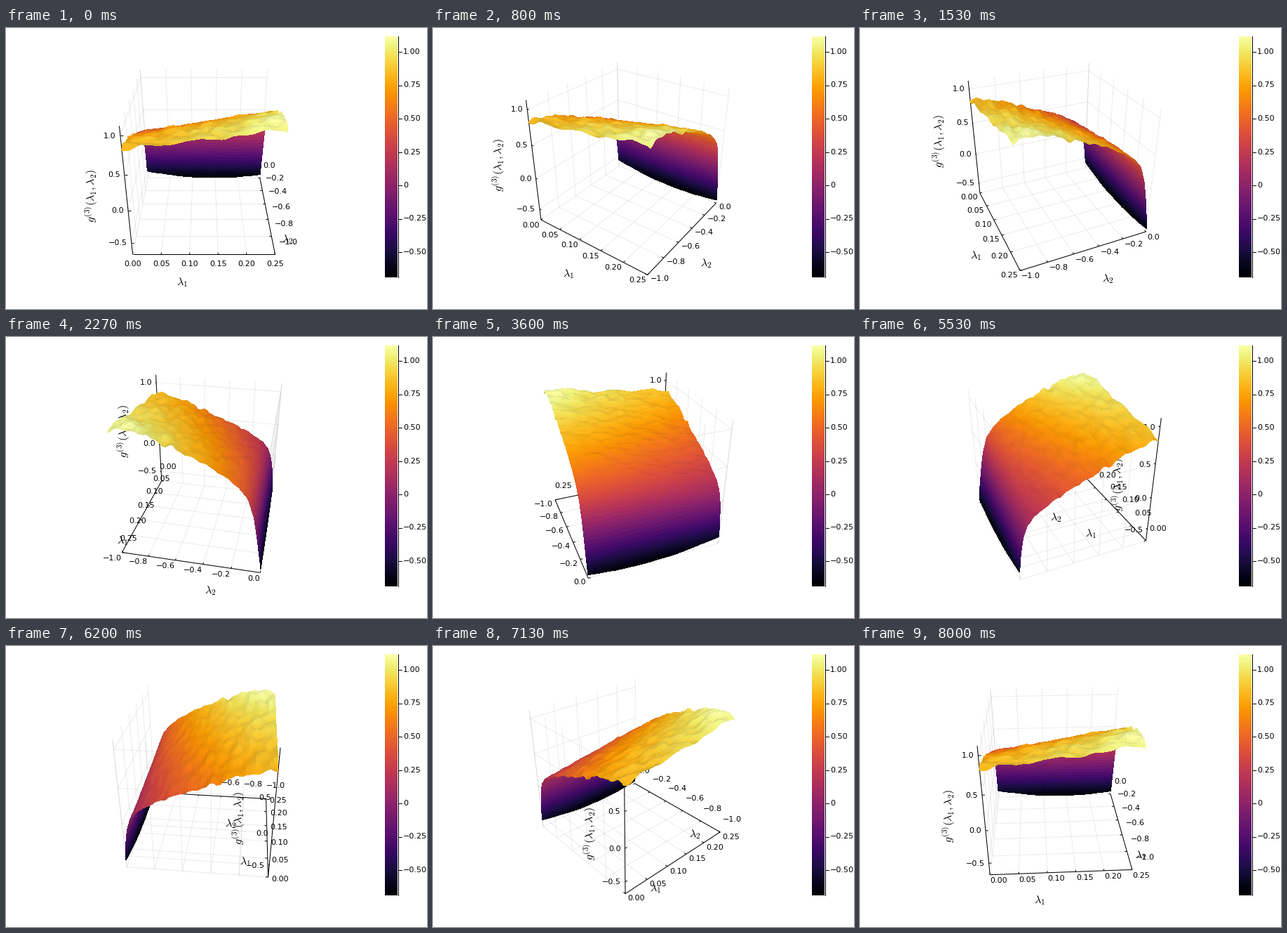
A matplotlib script for the animation above (8.07 s loop, 600 px wide and 400 px high).

```python
import numpy as np
import matplotlib.pyplot as plt
from matplotlib.animation import FuncAnimation
from matplotlib.collections import LineCollection, PolyCollection

W, H = 600, 400
FRAMES, LOOP_MS = 121, 8070
ZMIN, ZMAX = -0.689, 1.116
CX, CY = 282, 183.5                  # centre of the 3D viewport
ELEV = np.radians(30)
DIST = np.sqrt(3) / np.sin(np.radians(15))
FOCAL = 172 / np.tan(np.radians(15))
CMAP = plt.get_cmap("inferno")

plt.rcParams.update({"font.family": "DejaVu Sans", "mathtext.fontset": "cm"})


def unit_z(v):
    """Map a value to the [-1, 1] height of the plot box."""
    return 2 * (v - ZMIN) / (ZMAX - ZMIN) - 1


def view(deg):
    a = np.radians(deg)
    s, c = np.sin(a), np.cos(a)
    se, ce = np.sin(ELEV), np.cos(ELEV)
    right = np.array([c, s, 0])
    up = np.array([-s * se, c * se, ce])
    cam = np.array([s * ce, -c * ce, se])
    return right, up, cam


def project(p, v):
    """Perspective projection to pixels, plus the depth."""
    right, up, cam = v
    depth = DIST - p @ cam
    xy = np.stack([CX + FOCAL * (p @ right) / depth,
                   CY - FOCAL * (p @ up) / depth], axis=-1)
    return xy, depth


def smooth_noise(shape, passes, seed=4):
    n = np.random.RandomState(seed).randn(*shape)
    for axis, count in enumerate(passes):
        for _ in range(count):
            n = (np.roll(n, 1, axis) + 2 * n + np.roll(n, -1, axis)) / 4
    return n / n.std()


def build_surface(nx=52, ny=82):
    t = np.linspace(0, 1, nx)[:, None]
    lam = np.linspace(0, 1, ny)[None, :] ** 1.8
    power = 0.5 + 0.16 * (1 - t) ** 2
    rise = (0.86 + 0.39 * t) * lam ** power - 0.2 * t * lam ** 4
    drop = 0.56 + 0.07 * t + 0.36 * t * (1 - t)
    fall = drop * np.exp(-(lam / (0.03 + 0.032 * t)) ** (1 + 0.6 * t))
    bump = 0.06 * np.exp(-((t - 0.95) / 0.14) ** 2 - ((lam - 0.88) / 0.09) ** 2)
    rough = 0.017 * (0.2 + lam) * smooth_noise((nx, ny), (4, 1))
    g = np.clip(rise - fall + bump + rough, ZMIN, ZMAX)
    x = np.broadcast_to(2 * t - 1, g.shape)
    y = np.broadcast_to(1 - 2 * lam, g.shape)
    return np.stack([x, y, unit_z(g)], axis=-1), g


pts, values = build_surface()


def corners(a):
    return a[:-1, :-1], a[1:, :-1], a[1:, 1:], a[:-1, 1:]


quads = np.stack(corners(pts), axis=2).reshape(-1, 4, 3)
mean_val = sum(corners(values)).ravel() / 4
base_rgb = CMAP((mean_val - ZMIN) / (ZMAX - ZMIN))[:, :3]
normals = np.cross(quads[:, 2] - quads[:, 0], quads[:, 3] - quads[:, 1])
normals /= np.linalg.norm(normals, axis=1, keepdims=True)

# Tick values and their places in the box
XT = np.arange(6) * 0.05
YT = np.arange(-5, 1) * 0.2
ZT = np.array([-0.5, 0.0, 0.5, 1.0])
ux, uy, uz = 8 * XT - 1, 2 * YT + 1, unit_z(ZT)


def grid_lines():
    segs = []
    for x in ux:
        segs += [[(x, -1, -1), (x, 1, -1)], [(x, 1, -1), (x, 1, 1)]]
    for y in uy:
        segs += [[(-1, y, -1), (1, y, -1)], [(-1, y, -1), (-1, y, 1)]]
    for z in uz:
        segs += [[(-1, 1, z), (1, 1, z)], [(-1, -1, z), (-1, 1, z)]]
    return np.array(segs, float)


def axis_lines(tick=0.035):
    segs = [[(-1, -1, -1), (1, -1, -1)],
            [(1, -1, -1), (1, 1, -1)],
            [(-1, -1, -1), (-1, -1, 1)]]
    segs += [[(x, -1, -1), (x, -1 + tick, -1)] for x in ux]
    segs += [[(1, y, -1), (1 - tick, y, -1)] for y in uy]
    segs += [[(-1, -1, z), (-1 + tick, -1, z)] for z in uz]
    return np.array(segs, float)


GRID, AXES = grid_lines(), axis_lines()

fig = plt.figure(figsize=(W / 100, H / 100), dpi=100, facecolor="white")
ax = fig.add_axes([0, 0, 1, 1])
ax.set_xlim(0, W)
ax.set_ylim(H, 0)
ax.axis("off")

PX = 0.72                            # points per pixel
grid = LineCollection([], colors=(0, 0, 0, 0.08), linewidths=PX, zorder=1)
axes = LineCollection([], colors="black", linewidths=PX, zorder=2)
surf = PolyCollection([], edgecolors="face", linewidths=0.3,
                      antialiaseds=False, zorder=4)
for c in (grid, axes, surf):
    ax.add_collection(c, autolim=False)


def number(v, digits):
    return f"{v:.{digits}f}".replace("-", "\u2212")


def labels(vals, digits):
    return [ax.text(0, 0, number(v + 0.0, digits), size=8, va="center", zorder=3)
            for v in vals]


def title(s, rotation=0):
    return ax.text(0, 0, s, size=11.6, ha="center", va="center",
                   rotation=rotation, zorder=3)


def box_points(x, y, z):
    return np.stack(np.broadcast_arrays(x, y, z), axis=-1).astype(float)


x_lab, y_lab, z_lab = labels(XT, 2), labels(np.round(YT, 1), 1), labels(ZT, 1)
x_pos = box_points(ux, -1, -1)
y_pos = box_points(1, uy, -1)
z_pos = box_points(-1, -1, uz)

titles = [(title(r"$\lambda_1$"), (0, -1, -1), (-31, 40.5)),
          (title(r"$\lambda_2$"), (1, 0, -1), (30, 40.5)),
          (title(r"$g^{(3)}(\lambda_1,\lambda_2)$", 90), (-1, -1, 0), (-50, 0))]


def draw_colorbar():
    ramp = np.linspace(1, 0, 256)[:, None]
    ax.imshow(ramp, cmap=CMAP, extent=(540, 558, 355, 12), aspect="auto",
              interpolation="nearest", zorder=1)
    ax.set_xlim(0, W)
    ax.set_ylim(H, 0)
    ax.plot([558.5, 558.5], [12, 355], color="black", lw=PX, zorder=2)
    for v in np.arange(-2, 5) * 0.25:
        y = 224 - 190 * v
        ax.plot([558.5, 564], [y, y], color="black", lw=PX, zorder=2)
        ax.text(566, y, number(v, 2) if v else "0", size=8, va="center")


def tick_offset(q):
    """Alignment and pixel offset of floor labels for a relative azimuth."""
    s, c = np.sin(np.radians(q)), np.cos(np.radians(q))
    if abs(s) < 1e-9:
        return "center", 0, 14 if c > 0 else -19
    dx = -3.5 * s if s > 0 else -5 * s
    if c > 1e-9:
        return ("right", dx, 5 + 3.3 * c) if s > 0 else ("left", dx, 2 + 6.5 * c)
    return "left", dx, -19 - 2 * s if s < 0 else -20


def place(texts, xy, ha, dx, dy):
    for text, (x, y) in zip(texts, xy):
        text.set_position((x + dx, y + dy))
        text.set_ha(ha)


def update(i):
    deg = 3 * i % 360
    v = view(deg)

    grid.set_segments(project(GRID, v)[0])
    axes.set_segments(project(AXES, v)[0])

    xy, depth = project(quads, v)
    order = np.argsort(-depth.mean(axis=1))
    light = np.minimum(0.84 + 0.2 * np.abs(normals @ v[2]), 1)
    surf.set_verts(xy[order])
    surf.set_facecolor((base_rgb * light[:, None])[order])

    place(x_lab, project(x_pos, v)[0], *tick_offset(deg))
    place(y_lab, project(y_pos, v)[0], *tick_offset(deg - 90))
    place(z_lab, project(z_pos, v)[0], "right", -6, 0.5)
    for text, p, (dx, dy) in titles:
        x, y = project(np.array(p, float), v)[0]
        text.set_position((x + dx, y + dy))
    return []


draw_colorbar()
update(0)
anim = FuncAnimation(fig, update, frames=FRAMES, interval=LOOP_MS / FRAMES,
                     repeat=True, repeat_delay=0, blit=False)
plt.show()
```
